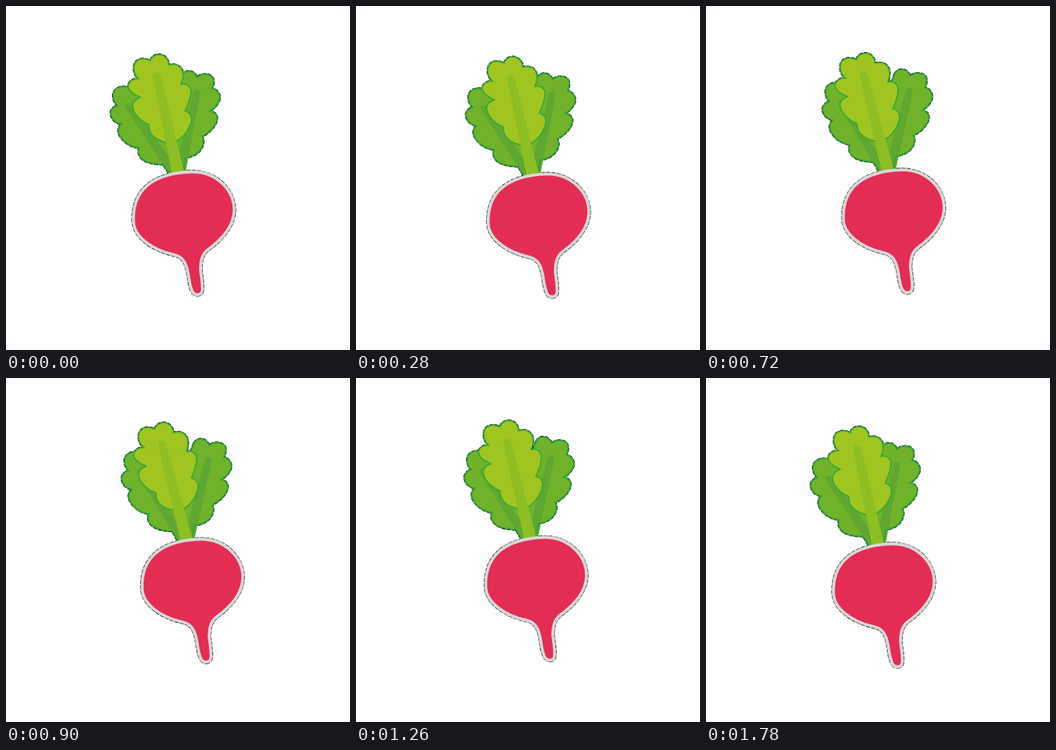
An HTML page with a canvas for the animation above (1820 ms loop, 500 by 500 pixels).

```html
<!DOCTYPE html>
<html>
<head>
<meta charset="utf-8">
<style>
html, body { margin: 0; height: 100%; overflow: hidden; background: #fff; }
canvas { display: block; }
</style>
</head>
<body>
<canvas id="stage" width="500" height="500"></canvas>
<script>
const ctx = document.getElementById('stage').getContext('2d');
const LOOP = 1820, CYCLE = 1780, STEP = 20;
const PIVOT = [250, 245], SWAY = 2.1 * Math.PI / 180;

const part = (turn, fill, line, width, outline, veinFill, vein) => ({
  turn, fill, line, width, outline: new Path2D(outline),
  veinFill, vein: new Path2D(vein || '')
});

const parts = [
  // right leaf
  part(1, '#70b32b', '#35a536', 2.2,
    `M256 102 C260 93 273 92 278.5 104 C287 96 303 99 302.5 110 C302.5 114 301.5 117 300 120
     C307 121 314 130 310.5 138 C307 146 301 151 296.5 153 C305 154 309 160 307 167
     C304 177 294 186 285.5 190 C290 196 287 206 281 212 C275 218 268 219 261 222
     L258.5 246 L240 246 L240 150 Z`,
    '#5fa730', 'M273 125 C274 120 283 120 283 127 L261 246 L245 246 Z'),
  // left leaf
  part(1, '#70b32b', '#35a536', 2.2,
    `M182 121 C173 114 157 118 156.5 130 C156.5 137 159 142 163 145
     C156 147 151.5 153 153.5 159 C155.5 167 162 171 169 172 C163 176 163 184 166.5 189
     C172.5 199 183 205.5 195 206.5 C191 212 195 221 202 225 C211 230 221 230 229.5 230.5
     L239 246 L252 246 L238 165 Z`,
    '#5fa730', 'M175 149 C172 143 180 139 184 145 L250 237 L250 246 L239 246 Z'),
  // front leaf
  part(-1, '#a0c520', '#3aaa35', 2,
    `M210.5 80 C214 67 236 67 237.5 86 C252 82 264 93 255 114
     C263 112 271 117 269.5 127 C268 140 263 149 261 153
     C270 155 272 163 269 172 C264 186 252 198 240 200
     C222 198 207 189 208.5 172.5 C196 168 185 156 184.5 145
     C185 139 190 135 196 133 C186 129 177 122 178.5 115 C180 109 187 105 194 106
     C185 100 185 86 190 81 C196 75 205 77 210.5 80 Z`,
    '#8dbe24', 'M215 104 C213.5 97 223.5 95 225.5 101 L260.5 246 L242.5 246 Z'),
  // root
  part(0, '#e32d54', '#d9d6d6', 4.4,
    `M248 243.5 C258 242 264 241.3 271 241.3 C307 241 332.5 268 332.5 297
     C332 325 306 346 293.5 355 C284 363 284 374 283.5 383 C285 395 287 406 286 414
     C285 422 274 422 271 414 C266 402 267 392 263.5 381 C260.5 370 255 364 243.5 361.5
     C214 355 186.5 336 186 313 C184.5 268 214 249.5 248 243.5 Z`)
];

function eachPart(sway, paint) {
  for (const p of parts) {
    ctx.save();
    ctx.translate(...PIVOT);
    ctx.rotate(p.turn * sway);
    ctx.translate(-PIVOT[0], -PIVOT[1]);
    paint(p);
    ctx.restore();
  }
}

// Thin broken dark edge that shows only outside the silhouette
function paintEdge(p) {
  ctx.setLineDash([6, 1.5]);
  ctx.strokeStyle = '#000';
  ctx.lineWidth = p.width + 1.2;
  ctx.stroke(p.outline);
}

function paintPart(p) {
  ctx.fillStyle = p.fill;
  ctx.fill(p.outline);
  ctx.fillStyle = p.veinFill || p.fill;
  ctx.fill(p.vein);
  ctx.strokeStyle = p.line;
  ctx.lineWidth = p.width;
  ctx.stroke(p.outline);
  if (p.turn < 0) ctx.fill(p.vein);
}

function draw(now) {
  const t = Math.min(Math.floor(now % LOOP / STEP) * STEP, CYCLE);
  const a = 2 * Math.PI * t / CYCLE;
  const sway = SWAY * (1 - Math.cos(a)) / 2;
  ctx.fillStyle = '#fff';
  ctx.fillRect(0, 0, 500, 500);
  ctx.save();
  ctx.lineJoin = 'round';
  ctx.translate(5.6 + 8 * Math.sin(a - 0.92), -3.6 + 6.4 * Math.sin(a + 0.54));
  eachPart(sway, paintEdge);
  eachPart(sway, paintPart);
  ctx.restore();
}

const start = performance.now();
function tick() {
  draw(performance.now() - start);
  requestAnimationFrame(tick);
}
tick();
</script>
</body>
</html>
```
